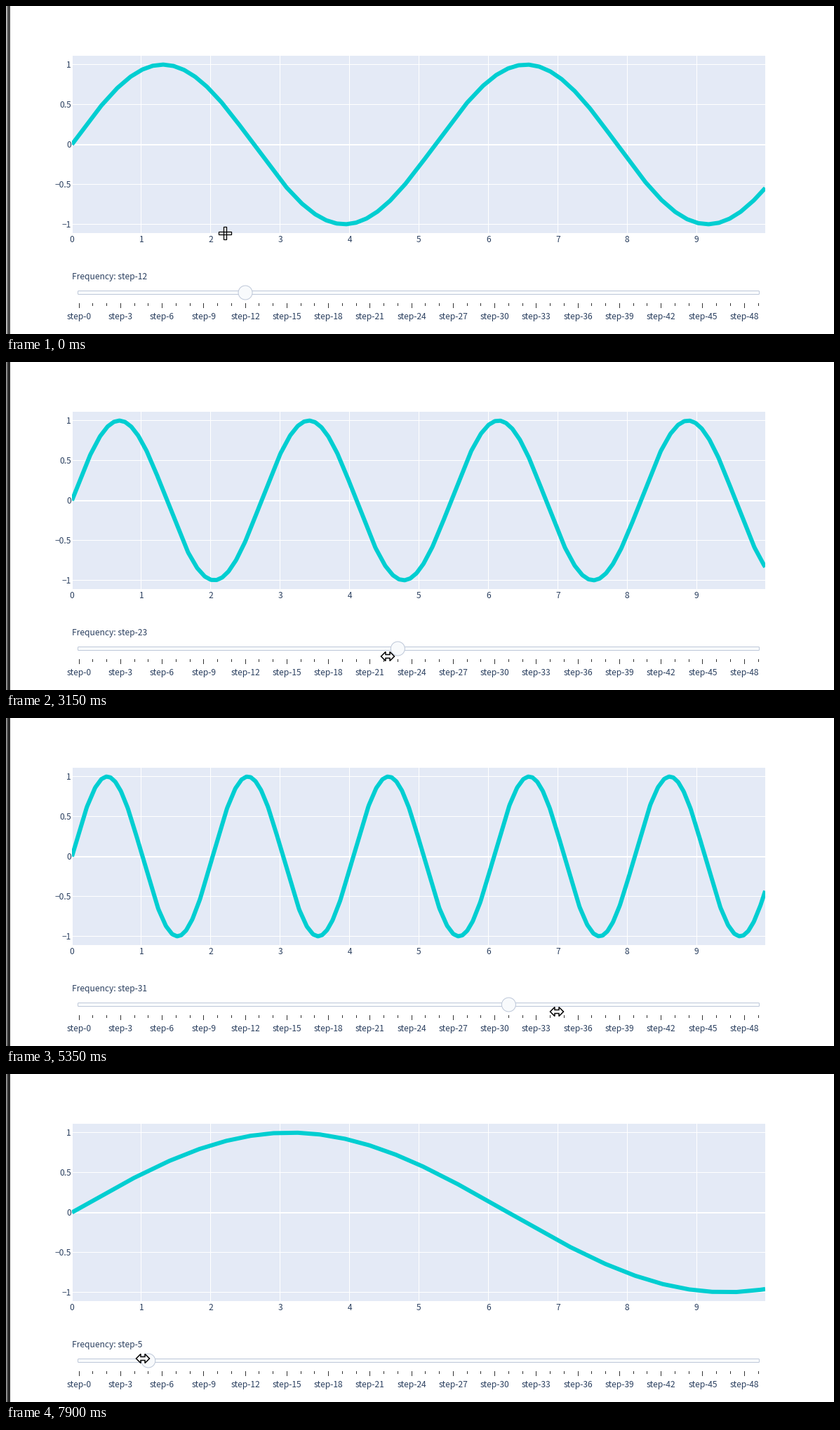
A matplotlib script that plays this animation: 1180x468 px, repeating every 8 s.

```python
import numpy as np
import matplotlib.pyplot as plt
from matplotlib.animation import FuncAnimation
from matplotlib.patches import Circle, FancyBboxPatch, Polygon, Rectangle

W, H, DPI = 1180, 468, 64
PX = 72 / DPI  # points per pixel
STEP_MS, LOOP_MS = 50, 8000

INK, TICK = "#2a3f5f", "#333333"
PANEL, CURVE = "#e4eaf6", "#00ced1"
BORDER, GRIP = "#bec8d9", "#f8fafc"

LEFT, RIGHT, TOP, BOTTOM = 94, 1082, 71, 324
UNIT = (RIGHT - LEFT) / 9.99
MID, AMP = (TOP + BOTTOM) / 2, 0.45 * (BOTTOM - TOP)
RAIL_Y, STOP0, STOP_GAP = 409, 104, 968 / 49

PRESS_MS = 1650
LAG_MS = 100  # the slider trails the pointer

# Turning points of the pointer: time, x, y
PATH = np.array([
    (200, 312, 324), (350, 320, 422), (600, 314, 425), (850, 343, 416),
    (1650, 343, 418), (2300, 418, 426), (2800, 600, 421), (3150, 544, 420),
    (3400, 506, 421), (3700, 506, 421), (4000, 717, 427), (4250, 892, 421),
    (4450, 1010, 411), (5150, 650, 411), (5350, 785, 419), (6100, 1015, 411),
    (6500, 1079, 420), (6650, 1073, 419), (7750, 212, 407), (7900, 195, 406),
])

# Screen refresh rhythm: from time, burst period, ticks per burst
RHYTHM = [(0, 50, 1), (3650, 250, 3), (4400, 200, 1), (5250, 250, 3), (6300, 200, 1)]

plt.rcParams.update({
    "font.family": "Noto Sans CJK JP",
    "font.size": 12 * PX,
    "text.color": INK,
    "path.simplify": False,
    "toolbar": "None",
})

fig = plt.figure(figsize=(W / DPI, H / DPI), dpi=DPI, facecolor="white")
ax = fig.add_axes([0, 0, 1, 1])
ax.set_xlim(0, W)
ax.set_ylim(H, 0)
ax.axis("off")


def box(x, y, w, h, color, z=1):
    return ax.add_patch(Rectangle((x, y), w, h, fc=color, lw=0, zorder=z))


def label(x, y, text, ha="center"):
    return ax.text(x, y, text, ha=ha, va="baseline", zorder=4)


def draw_chart():
    w, h = RIGHT - LEFT, BOTTOM - TOP
    panel = box(LEFT, TOP, w, h, PANEL)
    for i in range(10):
        x = LEFT + UNIT * i
        box(int(x), TOP, 1, h, "white", 2)
        label(x, 336.8, str(i))
    for i in range(-2, 3):
        y = MID - AMP * i / 2
        box(LEFT, int(y), w, 1, "white", 2)
        label(93, y + 4.2, f"{i / 2:g}".replace("-", "\u2212"), "right")
    box(LEFT, int(MID), w, 2, "white", 2)
    box(LEFT - 1, TOP, 2, h, "white", 2)
    return panel


def draw_slider():
    ax.add_patch(FancyBboxPatch(
        (102.5, RAIL_Y - 2.5), 971, 5, boxstyle="round,pad=0,rounding_size=1",
        fc=GRIP, ec=BORDER, lw=PX, zorder=3))
    for i in range(50):
        x = STOP0 + STOP_GAP * i
        major = i % 3 == 0
        box(int(x + 1e-6), 424, 1, 7 if major else 4, TICK, 3)
        if major:
            label(x, 446.6, f"step-{i}")


def decimate(pts, tol=1.5):
    """Merge runs of points that stay within tol of a straight line."""
    out, i, n = [pts[0]], 1, len(pts)
    start = pts[0]
    while i < n:
        end = pts[i]
        u = (end - start) / np.hypot(*(end - start))
        lo = hi = 0
        i += 1
        while i < n:
            v = pts[i] - start
            dev = v[0] * u[1] - v[1] * u[0]
            lo, hi = min(lo, dev), max(hi, dev)
            if hi - lo > tol:
                break
            end = pts[i]
            i += 1
        out.append(end)
        if i < n:
            start = pts[i]
            out.append(start)
            i += 1
    return np.array(out)


def wave(step):
    x = np.arange(0, 10, 0.01)
    y = np.sin(step / 10 * x)
    pts = np.column_stack([LEFT + UNIT * x, MID - AMP * y])
    return decimate(np.round(pts, 2))


def refresh_time(now):
    start, period, ticks = [r for r in RHYTHM if r[0] <= now][-1]
    bursts, into = divmod(now - start, period)
    return start + bursts * period + min(into, (ticks - 1) * STEP_MS)


def pointer(t):
    return np.array([np.interp(t, PATH[:, 0], PATH[:, k]) for k in (1, 2)])


def slider_step(t):
    if t < PRESS_MS:
        return 12
    x = pointer(t - LAG_MS)[0]
    return int(np.clip(round((x - STOP0) / STOP_GAP), 0, 49))


def outline(shape, width):
    return ax.add_patch(Polygon(shape, closed=True, fc="white", ec="black",
                                lw=width * PX, joinstyle="miter", zorder=8))


panel = draw_chart()
draw_slider()
edge_light = box(0, 0, 2, H, "#b4b4b4")
edge_dark = box(2, 0, 4, H, "#4d4d4d")

curve, = ax.plot([], [], color=CURVE, lw=6 * PX, solid_capstyle="butt",
                 solid_joinstyle="miter", zorder=3)
curve.set_clip_path(panel)
caption = label(LEFT, 389.8, "", "left")
grip = ax.add_patch(Circle((0, RAIL_Y), 10, fc=GRIP, ec=BORDER, lw=PX, zorder=5))

ARM = np.array([(2, -1.7), (9.4, -1.7), (9.4, 1.7), (2, 1.7)])
QUARTER = np.array([(0, -1), (1, 0)])
ARMS = [ARM @ np.linalg.matrix_power(QUARTER, k) for k in range(4)]
cross = [outline(arm, 1.3) for arm in ARMS]

HALF = np.array([(0, -2.5), (3, -2.5), (3, -6.5), (9.5, 0), (3, 6.5), (3, 2.5), (0, 2.5)])
ARROW = np.vstack([HALF, -HALF])
arrow = outline(ARROW, 1.5)


def update(frame):
    t = refresh_time(frame * STEP_MS)
    step, pos = slider_step(t), pointer(t)

    curve.set_data(*wave(step).T)
    caption.set_text(f"Frequency: step-{step}")
    grip.center = (STOP0 + STOP_GAP * step, RAIL_Y)

    on_chart = pos[1] <= BOTTOM
    for part, arm in zip(cross, ARMS):
        part.set_xy(arm + pos)
        part.set_visible(on_chart)
    arrow.set_xy(ARROW + pos)
    arrow.set_visible(not on_chart)

    pressed = t >= PRESS_MS
    edge_light.set_facecolor("#8c8c8c" if pressed else "#b4b4b4")
    edge_dark.set_facecolor("#2b2b2b" if pressed else "#4d4d4d")
    return [curve, caption, grip, arrow, *cross, edge_light, edge_dark]


anim = FuncAnimation(fig, update, frames=LOOP_MS // STEP_MS, interval=STEP_MS,
                     repeat=True, repeat_delay=0, blit=False)
plt.show()
```
